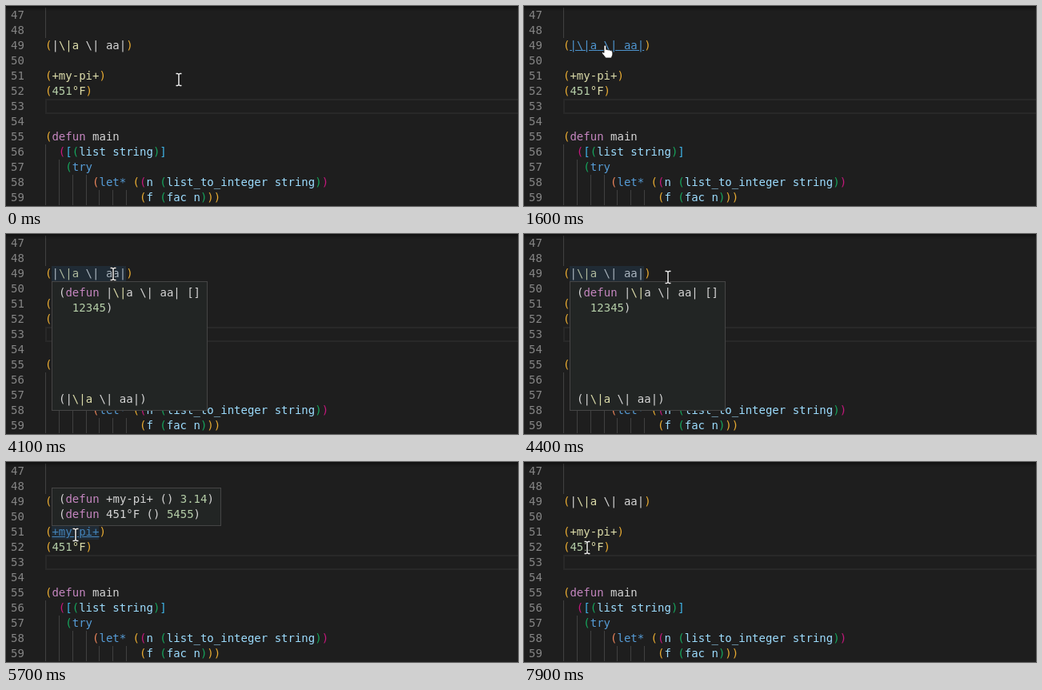
These frames come from a looping animation (640x250 px, 8000 ms). An HTML page:

```html
<!DOCTYPE html>
<html lang="en">
<head>
<meta charset="utf-8">
<style>
html, body { margin: 0; width: 100%; height: 100%; overflow: hidden; background: #1e1e1e; }
body { position: relative; font: 14px/19px "DejaVu Sans Mono", monospace; color: #d4d4d4; white-space: pre; }
body * { box-sizing: border-box; }
div, svg { position: absolute; }
.num { left: 6px; color: #858585; }
.code { left: 49px; }
.guide { width: 1px; height: 19px; background: #404040; }
.current { left: 49px; top: 116px; width: 700px; height: 19px; border: 2px solid #282828; }
.shade { left: 0; top: 0; width: 100%; height: 6px; box-shadow: #000 0 6px 6px -6px inset; }
.word { height: 19px; background: #264f7840; }
.pop { left: 57px; padding: 4px 8px; background: #222524; border: 1px solid #454545; }
.link, .link * { color: #4e94ce !important; text-decoration: underline; }
.y { color: #e8ab32 } .m { color: #c4187c } .b { color: #3fb4e8 } .g { color: #16a45c } .o { color: #e8835a }
.k { color: #c586c0 } .c { color: #569cd6 } .v { color: #9cdcfe } .f { color: #dcdcaa } .n { color: #b5cea8 }
</style>
</head>
<body>
<script>
const STEP = 100, LOOP = 8000, CHAR = 8.428, LEFT = 49;

// Pieces are split by "~"; the first letter of each is its colour class.
const paint = s => s.split("~").map(p => `<span class="${p[0]}">${p.slice(1)}</span>`).join("");

function add(cls, html = "", style = {}) {
  const el = document.createElement("div");
  el.className = cls;
  el.innerHTML = html;
  Object.assign(el.style, style);
  document.body.append(el);
  return el;
}

// [indent, text]
const rows = [
  [1, "w"],
  [1, "w"],
  [0, "y(~l<span id=pipe><span>|</span><span class=f>\\|a</span> \\| aa|</span>~y)"],
  [0, "w"],
  [0, "y(~f<span id=pi>+my-pi+</span>~y)"],
  [0, "y(~n451~f°F~y)"],
  [0, "w"],
  [0, "w"],
  [0, "y(~kdefun~w main"],
  [2, "m(~b[~g(~vlist string~g)~b]"],
  [3, "g(~ctry"],
  [7, "o(~clet*~w ~y(~m(~vn ~g(~vlist_to_integer string~g)~m)"],
  [14, "y(~vf ~g(~vfac n~g)~y)~y)"]
];

add("current");
rows.forEach(([indent, text], i) => {
  const top = 2 + 19 * i + "px";
  add("num", 47 + i, { top });
  for (let c = 0; c < indent; c += 2)
    add("guide", "", { top, left: Math.round(LEFT + c * CHAR) + "px" });
  add("code", (indent > 1 ? " ".repeat(indent) : "") + paint(text), { top });
});
add("shade");

const wordMark = (top, chars) =>
  add("word", "", { top: top + "px", left: LEFT + CHAR + "px", width: chars * CHAR + "px" });
const pipeMark = wordMark(40, 11), piMark = wordMark(78, 7);

const pipePop = add("pop", paint("w(~kdefun~w |~f\\|~wa \\| aa| []\n  ~n12345~w)\n\n\n\n\n\n(|~f\\|a~w \\| aa|)"), { top: "59px" });
const piPop = add("pop", paint("w(~kdefun~w +my-pi+ () ~n3.14~w)\n(~kdefun~w 451°F () ~n5455~w)"),
  { top: "32px", width: "212px", height: "48px" });

document.body.insertAdjacentHTML("beforeend", `
<svg id="beam" width="10" height="20" viewBox="-5 -10 10 20" fill="none">
  <path id="stem" d="M-3.5 -7.5H-1.5L0 -6.5L1.5 -7.5H3.5M0 -6.5V6.5M-3.5 7.5H-1.5L0 6.5L1.5 7.5H3.5" stroke="#111" stroke-width="3"/>
  <use href="#stem"/>
  <path d="M-3.5 -7.5H-1.5L0 -6.5L1.5 -7.5H3.5M0 -6.5V6.5M-3.5 7.5H-1.5L0 6.5L1.5 7.5H3.5" stroke="#fff" stroke-width="1.4"/>
</svg>
<svg id="hand" width="18" height="20" viewBox="0 0 18 20" style="left:96px;top:47px">
  <path d="M4 3.5Q4 2 5.3 2T6.7 3.5V7.5Q8 6.7 9 8Q10.6 7.2 11.7 8.6Q14.8 8 14.8 11V14L13.2 18H6.2L1.8 12.4Q1 10.6 2.4 10.4L4 11.5Z" fill="#fff" stroke="#111" stroke-width=".8"/>
</svg>`);

const $ = id => document.getElementById(id);
const beam = $("beam"), hand = $("hand");

// Pointer stops: [ms, x, y]
const path = [
  [0, 216, 92], [100, 216, 92], [500, 259, 120], [600, 259, 120],
  [1000, 178, 84], [1400, 100, 51], [4000, 100, 51], [4100, 134, 50],
  [4400, 180, 54], [4700, 172, 80], [4900, 147, 95], [5000, 127, 91],
  [5300, 87, 91], [6600, 87, 91], [6700, 93, 102], [6800, 100, 95],
  [7000, 100, 95], [7100, 102, 92], [7400, 102, 92], [7900, 79, 107], [LOOP, 79, 107]
];

function pointer(t) {
  const i = path.findIndex(p => p[0] > t);
  const [t0, x0, y0] = path[i - 1], [t1, x1, y1] = path[i];
  const k = (t - t0) / (t1 - t0);
  return [x0 + (x1 - x0) * k, y0 + (y1 - y0) * k].map(Math.round);
}

const show = (el, on) => el.style.opacity = +on;

function draw(now) {
  const t = Math.floor(now % LOOP / STEP) * STEP;
  const within = (a, b) => t >= a && t < b;
  const fade = (a, b) => within(a, b) ? (t === a ? 0.5 : 1) : 0;

  const [x, y] = pointer(t);
  beam.style.left = x - 5 + "px";
  beam.style.top = y - 10 + "px";
  const linked = within(1600, 4100);
  show(hand, linked);
  show(beam, !linked);

  $("pipe").classList.toggle("link", within(1400, 4100));
  $("pi").classList.toggle("link", within(5300, 6700));
  show(pipeMark, within(2000, 4600));
  show(piMark, within(5600, 7000));

  const extra = t < 2500 ? 7 : 0;
  pipePop.style.width = 195 + extra + "px";
  pipePop.style.height = 162 + extra + "px";
  show(pipePop, fade(2000, 4600));
  show(piPop, fade(5600, 7000));
  requestAnimationFrame(draw);
}
requestAnimationFrame(draw);
</script>
</body>
</html>
```
